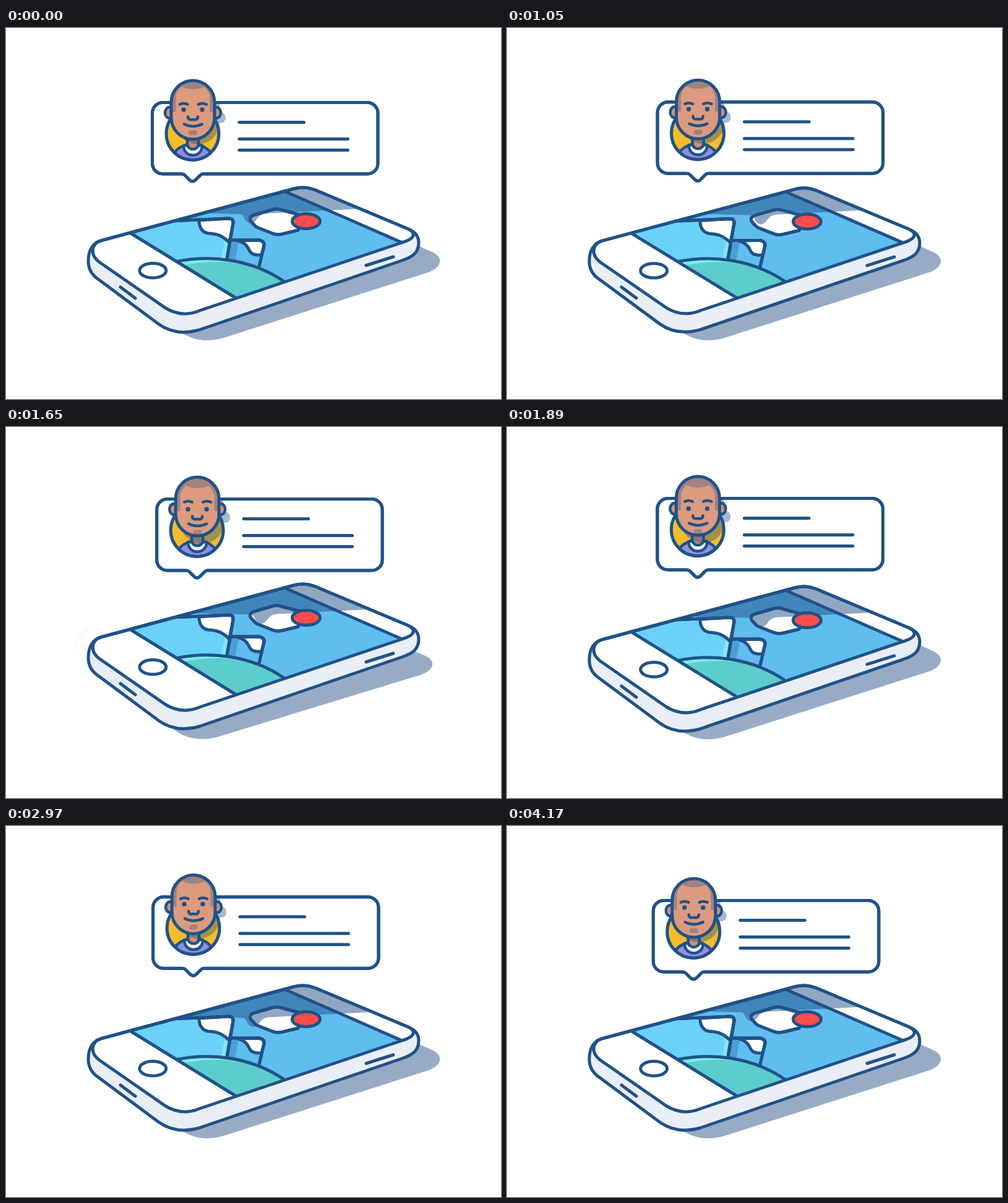
An HTML page with a canvas for the animation above (4.2 s loop, 800 by 600 pixels).

```html
<!DOCTYPE html>
<html lang="en">
<head>
<meta charset="utf-8">
<title>Phone message</title>
<style>
html, body { margin: 0; width: 100%; height: 100%; overflow: hidden; background: #fff; }
canvas { display: block; width: 800px; height: 600px; }
</style>
</head>
<body>
<canvas id="stage" width="800" height="600"></canvas>
<script>
const ctx = document.getElementById('stage').getContext('2d');
const LOOP = 4200;
const INK = '#205287', SKIN = '#dc9a7e', SHADE = 'rgba(35,80,133,';

// [time, value] pairs
const driftX = [[0, 0], [690, 5], [1260, 7.3], [1650, 7.2], [2280, 4.9], [2900, 1.4], [3570, -0.7]];
const driftY = [[0, 0], [690, 1], [1260, -2], [1650, -4], [2280, -6], [2900, -6], [3570, -3]];
const squash = [[1000, 1], [1220, 0.96], [1270, 0.964], [1400, 1]];
const lift = [[1180, 0], [1260, -0.5], [1460, -7], [1650, -4], [1900, 0]];
const ringing = [[1230, 0], [1260, 0.05], [1400, 0.2], [1640, 0]];
const nodding = [[1260, 0], [1600, 5], [2300, 4.8], [2650, 0]];
const browLift = [[1050, 0], [1230, -3], [2320, -3], [2600, 0]];
const blink = [[3480, 1], [3570, 0.66], [3610, 0.15], [3720, 1]];

// periodic cubic through the keys
function drift(keys, t) {
  const n = keys.length;
  const key = i => {
    const k = keys[(i + n) % n];
    return [k[0] + Math.floor(i / n) * LOOP, k[1]];
  };
  let i = n - 1;
  while (keys[i][0] > t) i--;
  const [a, b, c, d] = [key(i - 1), key(i), key(i + 1), key(i + 2)];
  const h = c[0] - b[0], u = (t - b[0]) / h;
  const m0 = (c[1] - a[1]) / (c[0] - a[0]) * h;
  const m1 = (d[1] - b[1]) / (d[0] - b[0]) * h;
  const u2 = u * u, u3 = u2 * u;
  return (2 * u3 - 3 * u2 + 1) * b[1] + (u3 - 2 * u2 + u) * m0 +
    (3 * u2 - 2 * u3) * c[1] + (u3 - u2) * m1;
}

function eased(keys, t) {
  if (t <= keys[0][0]) return keys[0][1];
  for (let i = 1; i < keys.length; i++) {
    const [t1, v1] = keys[i], [t0, v0] = keys[i - 1];
    if (t < t1) {
      const u = (t - t0) / (t1 - t0);
      return v0 + (v1 - v0) * u * u * (3 - 2 * u);
    }
  }
  return keys[keys.length - 1][1];
}

const P = d => new Path2D(d);

function fill(path, color) {
  ctx.fillStyle = color;
  ctx.fill(path);
}

function line(path, width = 5, color = INK) {
  ctx.lineWidth = width;
  ctx.strokeStyle = color;
  ctx.stroke(path);
}

function both(path, color, width) {
  fill(path, color);
  line(path, width);
}

function oval(x, y, rx, ry) {
  const p = new Path2D();
  p.ellipse(x, y, rx, ry, 0, 0, Math.PI * 2);
  return p;
}

function within(clip, draw) {
  ctx.save();
  ctx.clip(clip);
  draw();
  ctx.restore();
}

function shifted(x, y, draw) {
  ctx.save();
  ctx.translate(x, y);
  draw();
  ctx.restore();
}

const ground = P('M640 340L690 363C706 371 706 386 683 395L352 501C326 509 301 505 283 492L240 460Z');
const body = P('M153 344L465 260Q482 255 500 262L650 325Q667 332 667 347C667 363 658 370 640 376L313 488Q275 499 247 479L150 407Q133 396 133 377C133 360 140 348 153 344Z');
const face = P('M153 344L465 260Q482 255 500 262L650 325C662 331 663 340 640 347L313 457Q285 469 258 453L150 378C136 367 137 350 153 344Z');
const screen = P('M200 331L450 264L640 347L372 437Z');
const edges = P('M200 331L372 437M450 264L640 347');
const peak = P('M195 331L272 312L360 308Q368 308 367 316L357 375L340 400L272 380Z');
const peakLine = P('M266 312L360 308Q368 308 367 316L357 374');
const peakSnow = P('M312 311L360 308Q368 308 367 316L361 347C349 335 341 333 327 332C317 331 312 322 312 311Z');
const peakLight = P('M354 342L361 346L357 375L347 375Z');
const hillock = P('M361 343L409 343Q418 345 417 352L409 386');
const hillockShade = P('M362 345L376 346L370 378L356 375Z');
const hillockSnow = P('M375 344L409 343Q418 345 417 352L413 367C398 368 395 364 392 357Q388 348 375 344Z');
const hillTop = P('M274 378C329 367 395 372 451 411');
const hill = P('M274 378C329 367 395 372 451 411L372 438Z');
const hillLight = P('M274 378C329 367 395 372 451 411C396 375 340 373 285 384Z');
const cloud = P('M394.500 308Q395 304 402 302L430 294Q437 291.500 445 294L485 305L472 327L447 333Q438 335.500 430 332L406 322.500Q403 321 401 318.500L396 313Q394.500 311 394.500 308Z');
const cast = P('M180 297L300 299L378 301Q383 301 385 307Q388 315 395 315.500Q401 316 407 307Q411 301 420 300L660 288L660 180L180 180Z');
const marks = P('M185 419L209 437M582 384L626 370');
const rippleR = P('M675 309Q690 325 688 346');
const rippleL = P('M133 325Q113 338 112 358');

const bubble = P('M253.500 120.500H584A17 17 0 0 1 601 137.500V219A17 17 0 0 1 584 236H318.500Q316 236 314 238L306 246Q301.500 250 297 246L289 238Q287 236 284 236H253.500A17 17 0 0 1 236.500 219V137.500A17 17 0 0 1 253.500 120.500Z');
const texts = P('M377 152.500H481.500M377 179.500H552.500M377 197.500H552.500');
const disc = oval(301.5, 171, 42.5, 42.5);
const head = P('M267 120A35 35 0 0 1 337 120V145A35 35 0 0 1 267 145Z');
const ears = [oval(264.5, 137, 7.5, 9), oval(339.5, 137, 7.5, 9)];
const shirt = P('M266 210C274 196 282 192 293 188H311C321 192 329 196 337 210V222H266Z');
const collar = P('M287 190C287 211 317 211 317 190Z');
const neck = P('M293 172V187C293 199 311 199 311 187V172Z');
const hair = P('M264 136H274.500V114C274.500 106 278 100 283 95Q302 103 321 95C326 100 329.500 106 329.500 114V136H340V74H264Z');
const brows = P('M281 123.500Q287 120.500 293.500 123.500M311 123.500Q317 120.500 324 123.500');
const smile = P('M294 143.500C294 150 300 148 302 148C304 148 310 150 310 143.500M288 155.500Q302 162.500 317 155.500');
const goatee = P('M299 165.500H305Q309 165.500 309 169Q309 173 305 173H299Q295 173 295 169Q295 165.500 299 165.500Z');

const castHead = new Path2D();
[head, ...ears].forEach(p => castHead.addPath(p));

function drawScreen() {
  fill(screen, '#60bdf0');
  within(screen, () => {
    fill(peak, '#6cd1f7');
    fill(peakLight, '#82e3fb');
    fill(hillockShade, '#4c9fd4');
    both(peakSnow, '#fff');
    line(peakLine);
    both(hillockSnow, '#fff');
    line(hillock);
    fill(hill, '#5dcccc');
    fill(hillLight, '#74f0ee');
    line(hillTop);
  });
  both(cloud, '#fff');
}

// the ground shadow shrinks toward the front corner as the phone rises
function drawGround(up) {
  const k = -up / 4;
  ctx.save();
  ctx.translate(330 - 8 * k, 495);
  ctx.scale(1 - 0.011 * k, 1 - 0.055 * k);
  ctx.translate(-330, -495);
  fill(ground, '#98abc4');
  ctx.restore();
}

function drawRipple(path, t) {
  const glow = eased(ringing, t);
  if (glow > 0) line(path, 5, `rgba(60,60,60,${glow})`);
}

function drawPhone(t, bx, by) {
  const up = eased(lift, t), sy = eased(squash, t);
  drawGround(up);
  drawRipple(rippleR, t);
  drawRipple(rippleL, t - 60);

  ctx.save();
  ctx.translate(0, 411 * (1 - sy) + up);
  ctx.scale(1, sy);
  fill(body, '#e9eef6');
  fill(face, '#fff');
  within(face, () => {
    drawScreen();
    shifted(bx * 2.2 - by * 0.3, by * -1.6, () => fill(cast, SHADE + '.5)'));
    line(edges);
  });
  // keep strokes crisp above the cast shade
  within(screen, () => {
    line(peakLine);
    line(hillock);
  });
  line(cloud);
  both(oval(485, 312.5, 22.5, 12), '#ff4d4b');
  both(oval(237.3, 392.3, 21.5, 11.8), '#fff');
  line(face);
  line(body);
  line(marks);
  ctx.restore();
}

function drawHead(t, nod) {
  ears.forEach(e => both(e, '#cf9280', 4.5));
  fill(head, SKIN);
  within(head, () => {
    shifted(0, nod * 0.8, () => fill(hair, SHADE + '.32)'));
    shifted(0, nod, () => {
      fill(goatee, SHADE + '.32)');
      line(smile, 4.5);
      const open = eased(blink, t);
      fill(oval(287, 132, 3.7, 3.7 * open), INK);
      fill(oval(317, 132, 3.7, 3.7 * open), INK);
      shifted(0, eased(browLift, t), () => line(brows, 4.5));
    });
  });
  line(head);
}

function drawBubble(t) {
  const nod = eased(nodding, t);
  both(bubble, '#fff');
  line(texts);
  fill(disc, '#f5bc2c');
  within(disc, () => {
    both(shirt, '#918fe0', 4.5);
    both(collar, '#f1fbff', 4.5);
    both(neck, '#d18f78', 4.5);
  });
  within(bubble, () => shifted(8, 8 + nod, () => fill(castHead, SHADE + '.4)')));
  line(bubble);
  line(disc);
  drawHead(t, nod);
}

function draw(t) {
  ctx.fillStyle = '#fff';
  ctx.fillRect(0, 0, 800, 600);
  ctx.lineCap = ctx.lineJoin = 'round';
  const bx = drift(driftX, t), by = drift(driftY, t);
  drawPhone(t, bx, by);
  shifted(bx, by, () => drawBubble(t));
}

const start = performance.now();
function tick() {
  draw((performance.now() - start) % LOOP);
  requestAnimationFrame(tick);
}
tick();
</script>
</body>
</html>
```
